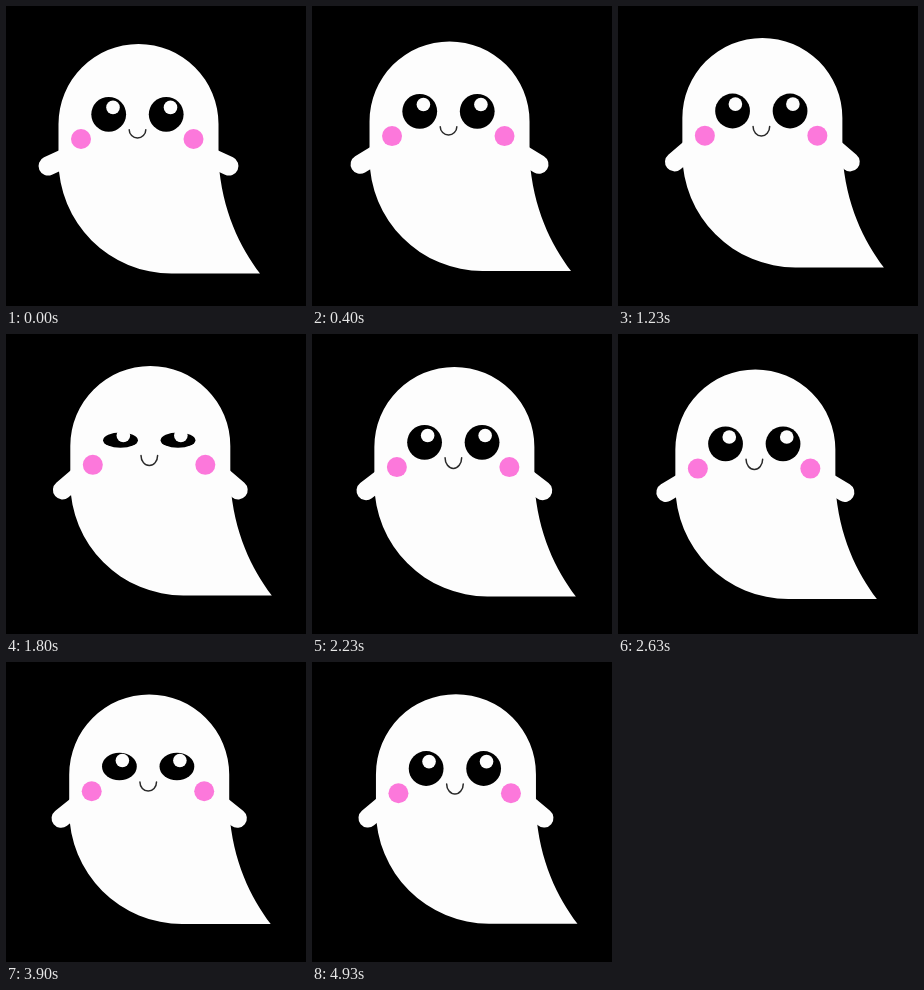
An HTML page for the animation above (5.01 s loop, 300 by 300 pixels).

```html
<!DOCTYPE html>
<html lang="en">
<head>
<meta charset="utf-8">
<title>Floating ghost</title>
<style>
  html, body { margin: 0; width: 100%; height: 100%; overflow: hidden; background: #000; }
  svg { display: block; width: 100vw; height: 100vh; }
  .skin { fill: #fdfdfd; }
  .arm { stroke: #fdfdfd; stroke-width: 19; stroke-linecap: round; }
  .cheek { fill: #fc78db; }
  #mouth { fill: none; stroke: #2a2a2a; stroke-width: 1.5; stroke-linecap: round; }
</style>
</head>
<body>
<svg viewBox="0 0 300 300">
  <g id="ghost">
    <line id="armL" class="arm" x1="66" y1="149" x2="42" y2="160"/>
    <line id="armR" class="arm" x1="199" y1="149" x2="223" y2="160"/>
    <path class="skin" d="M52.5 118A80 80 0 0 1 212.5 118V155C216 205 234 241 254 267.5H165.5A113 113 0 0 1 52.5 154.5Z"/>
  </g>
  <g id="face">
    <circle class="cheek" cx="75" cy="133" r="10"/>
    <circle class="cheek" cx="187.5" cy="133" r="10"/>
    <g class="eye" transform="translate(102.7 108.3)"><ellipse rx="17.4"/><circle class="skin" r="6.8"/></g>
    <g class="eye" transform="translate(160.2 108.3)"><ellipse rx="17.4"/><circle class="skin" r="6.8"/></g>
    <path id="mouth"/>
  </g>
</svg>
<script>
const LOOP = 5010, DRIFT = 3000;
const [ghost, face, armL, armR, mouth] =
  ['ghost', 'face', 'armL', 'armR', 'mouth'].map(id => document.getElementById(id));
const eyes = [...document.querySelectorAll('.eye')];
const set = (el, attrs) => {
  for (const name in attrs) el.setAttribute(name, attrs[name]);
};

// The picture advances in runs of eleven 50 ms steps with uneven pauses.
function stepped(t) {
  if (t < 30) return 0;
  const m = (t - 30) % 1100, run = m < 570 ? 0 : 570;
  return t - m + run + Math.min(10, Math.floor((m - run) / 50)) * 50;
}

// cubic-bezier(.25, .1, .25, 1)
function ease(x) {
  const bez = (a, b, s) => 3 * a * s * (1 - s) ** 2 + 3 * b * s * s * (1 - s) + s ** 3;
  let lo = 0, hi = 1;
  for (let i = 0; i < 24; i++) {
    const mid = (lo + hi) / 2;
    if (bez(.25, .25, mid) < x) lo = mid; else hi = mid;
  }
  return bez(.1, 1, lo);
}

// Face height at equal intervals of the drift, joined by a closed spline.
const bob = [0, -3.6, -3.6, -2.8, -1.5, 1.6];
function spline(points, phase) {
  const n = points.length, i = Math.floor(phase * n), u = phase * n - i;
  const [a, b, c, d] = [-1, 0, 1, 2].map(k => points[(i + k + n) % n]);
  return b + u / 2 * (c - a + u * (2 * a - 5 * b + 4 * c - d + u * (3 * (b - c) + d - a)));
}

function eyeOpen(t) {
  const p = t % 2000;
  if (p < 1700 || p > 1960) return 1;
  return p < 1800 ? 1 - .56 * (p - 1700) / 100 : .44 + .56 * (p - 1800) / 160;
}

function draw(t) {
  const phase = t % DRIFT / DRIFT;
  const e = ease(1 - Math.abs(1 - 2 * phase));
  const x = 12.1 * e, y = -6.2 * e, faceY = spline(bob, phase);
  const open = eyeOpen(t);

  set(ghost, { transform: `translate(${x} ${y})` });
  set(armL, { transform: `rotate(${-16 * e} 50.5 151.5)` });
  set(armR, { transform: `rotate(${16 * e} 214.5 151.5)` });
  set(face, { transform: `translate(${x} ${faceY})` });
  for (const eye of eyes) {
    set(eye.children[0], { ry: 17.4 * open });
    set(eye.children[1], { cx: 4.3 - 1.5 * e, cy: -6.9 * (.4 + .6 * open) });
  }
  const depth = 8.3 + .45 * (faceY - y);
  set(mouth, { d: `M123.2 123.7a8.3 ${depth} 0 0 0 16.6 0` });
}

const start = performance.now();
function tick() {
  draw(stepped((performance.now() - start) % LOOP));
  requestAnimationFrame(tick);
}
tick();
</script>
</body>
</html>
```
